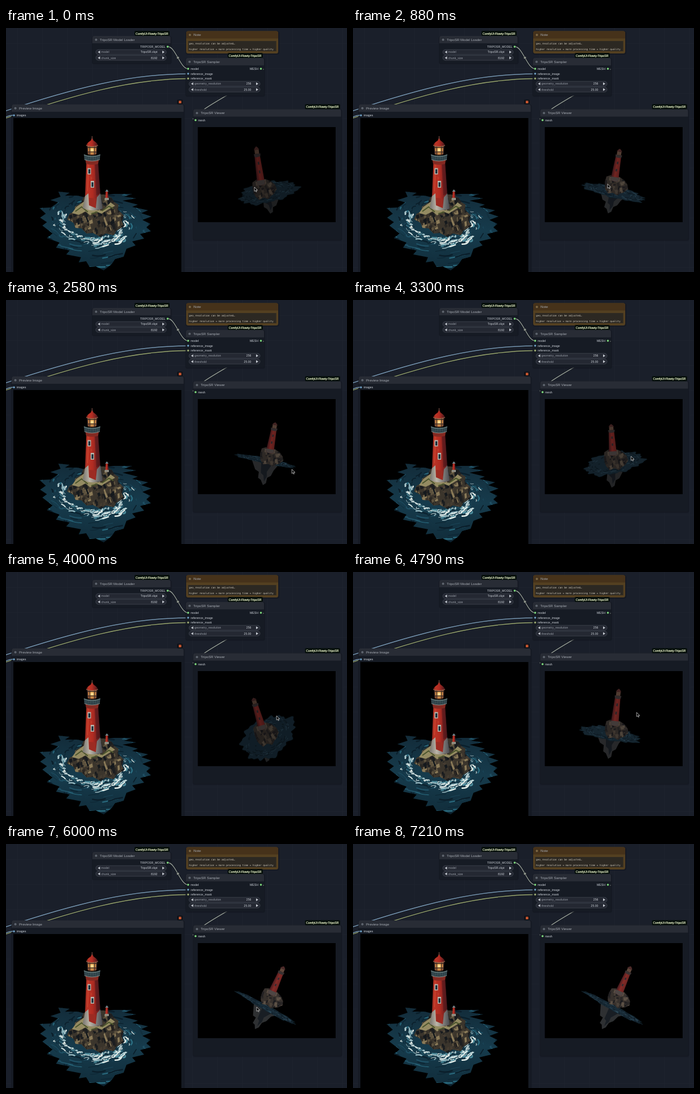
Animation of 600x431 px, one loop 7.24 s. Source, as an HTML page:

```html
<!DOCTYPE html>
<html lang="en">
<head>
<meta charset="utf-8">
<title>Node graph</title>
<style>
html, body { margin: 0; width: 100%; height: 100%; overflow: hidden; background: #1a1f2a; }
svg { display: block; width: 100%; height: 100%; font: 5.2px "Liberation Sans", Arial, sans-serif; }
.title { font-size: 6.15px; fill: #a6abb3; }
.note { font: 4.33px "DejaVu Sans Mono", monospace; fill: #d8d2c4; }
.wire { fill: none; stroke-width: 1.4; }
</style>
</head>
<body>
<svg id="stage" viewBox="0 0 600 431" preserveAspectRatio="none">
  <defs>
    <pattern id="grid" width="44" height="44" patternUnits="userSpaceOnUse" x="20" y="27">
      <path d="M0 .5H44M.5 0V44" stroke="#1d222d" fill="none"/>
    </pattern>
    <linearGradient id="red">
      <stop offset="0" stop-color="#5c1b19"/><stop offset=".2" stop-color="#bd3526"/>
      <stop offset=".5" stop-color="#b02c22"/><stop offset=".75" stop-color="#7c2220"/>
      <stop offset="1" stop-color="#3b1519"/>
    </linearGradient>
    <linearGradient id="dimRed">
      <stop offset="0" stop-color="#3d191d"/><stop offset=".45" stop-color="#852b27"/>
      <stop offset="1" stop-color="#652321"/>
    </linearGradient>
    <linearGradient id="stone">
      <stop offset="0" stop-color="#77746e"/><stop offset=".35" stop-color="#bbb5a8"/>
      <stop offset="1" stop-color="#494a50"/>
    </linearGradient>
    <linearGradient id="sea" x2="0" y2="1">
      <stop offset="0" stop-color="#132c3a"/><stop offset=".5" stop-color="#163b4c"/>
      <stop offset="1" stop-color="#112d3b"/>
    </linearGradient>
    <radialGradient id="glow">
      <stop offset="0" stop-color="#fff0ae"/><stop offset=".45" stop-color="#eead54"/>
      <stop offset="1" stop-color="#8f5433"/>
    </radialGradient>
    <clipPath id="seaClip"><use href="#seaShape"/></clipPath>
    <clipPath id="rockClip"><use href="#rockShape"/></clipPath>
    <clipPath id="reefClip"><use href="#reefShape"/></clipPath>
    <clipPath id="viewClip"><path d="M337.500 175H580V343H337.500Z"/></clipPath>
  </defs>
  <rect width="600" height="431" fill="#1a1f2a"/>
  <rect width="600" height="431" fill="url(#grid)"/>
  <g id="graph"></g>

  <g id="painting">
    <path id="seaShape" fill="url(#sea)" d="M92 289L112 291L104 296L126 296L138 299L190 293L222 293L207 298L229 301L205 305L232 312L222 316L250 322L238 327L256 333L240 339L254 346L247 352L255 359L236 364L243 372L222 377L228 384L212 390L207 404L192 408L186 417L172 428L158 421L147 422L141 412L128 414L132 405L106 400L112 393L88 388L94 379L72 371L82 363L64 349L72 343L60 335L70 328L59 318L79 317L92 308L78 304L96 298Z"/>
    <g clip-path="url(#seaClip)" fill="none" stroke-linecap="round"><g id="waves"></g><g id="foam"></g></g>
    <path id="rockShape" fill="#3b352c" d="M107 338L112 328L120 324L122 315L132 309L136 299L148 294L173 294L186 300L190 307L198 312L197 321L207 331L204 342L208 350L194 358L190 366L176 363L166 369L153 362L142 363L133 354L122 353L119 344Z"/>
    <g id="facets" clip-path="url(#rockClip)"></g>
    <path d="M116 327L124 316L138 306L140 318L170 323L184 308L192 314L181 320L168 328L158 324L148 331L140 324L128 330Z" fill="#948b62"/>
    <path d="M122 324L133 316L144 325M169 323L181 315L189 319M150 328L161 325" stroke="#4b552d" stroke-width="2" fill="none"/>
    <path d="M175.500 289h4l1 15h-6z" fill="url(#red)"/><path d="M174.500 289l3-4l3 4z" fill="#77868a"/><path d="M174 300h7v4h-7z" fill="#8f8b80"/>
    <path d="M141.500 237H162L166 296L169 319Q153 325 136 318L139 296Z" fill="url(#red)"/>
    <path d="M139 297L145 292L146 313L158 318L160 299L166 292L170 319Q153 326 135 318Z" fill="url(#stone)"/>
    <path d="M146 300L158 301L158 318L146 313Z" fill="#9c2b22"/>
    <path d="M156 238L162 237L166 291L159 296Z" fill="#3f141a" opacity=".5"/>
    <path d="M145.500 241L143.500 288M150 263L150 268" stroke="#e4603e" opacity=".5" fill="none"/>
    <path d="M143.500 247.500h6v11h-6zM149 270h6v12h-6z" fill="#bcbab0"/>
    <path d="M145 249.500h3.300v7.500H145zM150.500 272.500h3.300v8h-3.300z" fill="#172d39"/>
    <path d="M139 229H164L162 240Q151 243 141 240Z" fill="#842a22"/>
    <path d="M137 223Q151 229 166 223L165 232Q151 237 138 232Z" fill="#2a3d44"/>
    <path d="M137 224Q151 230 166 224M138 232.500Q151 237.500 165 232.500" stroke="#7d928f" fill="none"/>
    <path id="rail" stroke="#5f777a" stroke-width=".6" fill="none"/>
    <path d="M143 207H160L159 223Q151 226 144 223Z" fill="url(#glow)"/>
    <path d="M143 207L144 223M147.500 208V224M155.500 208V224M160 207L159 223M143 211H160M143.500 219H159.500" stroke="#3b2a27" stroke-width="1.300"/>
    <path d="M141 207.500Q143 202 149 199L151.500 193L154 199Q160 202 162 207.500Q151 211 141 207.500Z" fill="url(#red)"/>
    <path d="M141 207.500Q151 211.500 162 207.500" stroke="#a77558" stroke-width=".9" fill="none"/>
    <path d="M151.500 197V191" stroke="#6b443c" stroke-width="1.400"/>
  </g>

  <g clip-path="url(#viewClip)">
    <g id="model">
      <path id="under" fill="#2e3032"/>
      <path id="underShade" fill="#191e24"/>
      <path id="disc" fill="#192c38" stroke="#142530" stroke-width=".6"/>
      <path id="ripples" fill="none" stroke="#2e495a" stroke-width=".8"/>
      <path id="darkRipples" fill="none" stroke="#111f29" stroke-width="1.300"/>
      <g id="reef">
        <path id="reefShape" d="M-15 -5L-8 -9L9 -8L18 -3L24 4L26 12L20 20L14 23L9 28L1 24L-7 27L-13 20L-15 14L-16 5Z" fill="#37312d"/>
        <g id="reefFacets" clip-path="url(#reefClip)"></g>
      </g>
      <g id="tower">
        <path d="M-5 -50L4.500 -50L7 0Q0 4 -7 0Z" fill="url(#dimRed)"/>
        <path d="M-6.600 -7L6.600 -7L7 0Q0 4 -7 0Z" fill="#4e4644"/>
        <path d="M-1 -39h2.500v5h-2.500zM-1 -24h2.500v5h-2.500z" fill="#302c31"/>
        <path d="M-6 -53H6L5 -48Q0 -46 -5 -48Z" fill="#3a3233"/>
        <path d="M-3.800 -60H3.800V-53H-3.800Z" fill="#5f463a"/>
        <path d="M-4.800 -60Q-3 -64 0 -66Q3 -64 4.800 -60Z" fill="#4d2a29"/>
      </g>
    </g>
  </g>
  <path id="cursor" d="M0 0V7.500L1.800 6L3 8.500L4.300 7.900L3.100 5.400H5.500Z" fill="#050505" stroke="#e6e6e6" stroke-width=".7"/>
</svg>
<script>
const $ = id => document.getElementById(id);
const LOOP = 7240, TAU = Math.PI * 2;

function random(seed) {
  return () => (seed = (seed * 16807) % 2147483647) / 2147483647;
}

const HEAD = '#282c35';
const box = (x, y, w, h, fill, r = 0, extra = '') =>
  `<rect x="${x}" y="${y}" width="${w}" height="${h}" rx="${r}" fill="${fill}" ${extra}/>`;
const label = (x, y, text, cls = '', fill = '#cbd0d7', anchor = 'start') =>
  `<text x="${x}" y="${y}" text-anchor="${anchor}" class="${cls}" ${cls ? '' : `fill="${fill}"`}>${text}</text>`;
const dot = (x, y, fill, r = 2) => `<circle cx="${x}" cy="${y}" r="${r}" fill="${fill}" stroke="#11151b" stroke-width=".5"/>`;
const wire = (d, color) => `<path class="wire" d="${d}" stroke="#10131a" style="stroke-width:2.600"/><path class="wire" d="${d}" stroke="${color}"/>`;

function node(x, y, w, h, title, head = HEAD, body = '#161b24') {
  return box(x - 1, y, w + 3, h + 2, '#11141c', 4, 'opacity=".5"') +
    box(x, y, w, h, body, 3.5) +
    `<path d="M${x} ${y + 13}v-9.500q0-3.500 3.500-3.500h${w - 7}q3.500 0 3.500 3.500v9.500z" fill="${head}"/>` +
    dot(x + 6.500, y + 6.700, head === HEAD ? '#5d636d' : '#7d6540', 2.500) +
    label(x + 13, y + 8.800, title, 'title');
}

function badge(x, y) {
  return box(x, y, 62, 9, '#07100c', 2) +
    `<text x="${x + 2}" y="${y + 6.500}" fill="#e9f3c8" stroke="#e9f3c8" stroke-width=".2">ComfyUI-Flowty-TripoSR</text>`;
}

function widget(x, y, w, name, value) {
  const arrow = (ax, dir) => `<path d="M${ax} ${y + 4.400}l${4 * dir} -2.500v5z" fill="#c4c9d0"/>`;
  return box(x, y, w, 8.800, '#242832', 4.400, 'stroke="#555b66" stroke-width=".5"') +
    arrow(x + 3.500, 1) + arrow(x + w - 3, -1) +
    label(x + 9.500, y + 6.200, name, '', '#969ca5') +
    label(x + w - 15.500, y + 6.200, value, '', '#cbd0d7', 'end');
}

const GREEN = '#82df82', BLUE = '#6f9fc4', OLIVE = '#9ba973', GREY = '#969f98';

$('graph').innerHTML = [
  wire('M-20 153C120 105 220 81 320 81', '#7899b5'),
  wire('M-20 166C120 117 220 90 320 89.500', OLIVE),
  wire('M452 72C466 85 319 148 333 163', GREY),

  node(152, 14, 137.500, 48, 'TripoSR Model Loader'), badge(226, 5),
  label(280.500, 35, 'TRIPOSR_MODEL', '', undefined, 'end'),
  widget(158, 38.200, 124, 'model', 'TripoSR.ckpt'), widget(158, 48.300, 124, 'chunk_size', '8192'),

  node(317, 5.500, 162, 39.500, 'Note', '#46321a', '#544021'),
  box(320.500, 23, 155, 18, '#2c2822'),
  label(322, 29.300, 'geo_resolution can be adjusted…', 'note'),
  label(322, 38.800, 'higher resolution = more processing time = higher quality', 'note'),

  node(316.500, 53, 137.500, 66.500, 'TripoSR Sampler'), badge(390, 44),
  wire('M285 33C298 33 307 72 320 72', GREY), dot(302.500, 52.500, '#959b91', 2.200),
  dot(284.500, 33, GREEN), dot(320.500, 72, GREEN), dot(320.500, 80.700, BLUE), dot(320.500, 89.300, OLIVE),
  label(325, 74, 'model'), label(325, 82.700, 'reference_image'), label(325, 91.300, 'reference_mask'),
  label(444, 74, 'MESH', '', undefined, 'end'), dot(448.500, 72, GREEN), dot(453, 73, GREY, .9),
  widget(322, 94.200, 125, 'geometry_resolution', '256'), widget(322, 104.300, 125, 'threshold', '25.00'),

  node(10, 135, 302.500, 310, 'Preview Image'),
  box(301, 126.500, 10, 8.500, '#101218', 2), box(304, 128.500, 4.500, 4.500, '#c9572f', .5),
  wire('M-2 158Q5 154 13 154', '#7899b5'), dot(14, 154.300, BLUE), label(18.500, 156.200, 'images'),
  box(13, 159, 295.500, 272, '#000'),

  node(329.500, 143.500, 260, 230.500, 'TripoSR Viewer'), badge(526, 134.500),
  dot(333.500, 162.800, GREEN), dot(329, 160.500, GREY, .9), label(338, 164.800, 'mesh'),
  box(337.500, 175, 242.500, 168, '#000')
].join('');

function paintScene() {
  const rnd = random(73), pick = list => list[Math.floor(rnd() * list.length)];
  // A stroke that follows the swell round the island.
  const swell = (a, r, span, color, width) => {
    const at = (angle, k) => `${(156 + Math.cos(angle) * 51 * k).toFixed(1)} ${(340 + Math.sin(angle) * 30 * k).toFixed(1)}`;
    return `<path d="M${at(a, r)}Q${at(a + span / 2, r + rnd() * .18 - .05)} ${at(a + span, r + rnd() * .1)}" stroke="${color}" stroke-width="${width.toFixed(1)}"/>`;
  };
  const shards = (count, x0, y0, w, h, size, colors) => Array.from({ length: count }, () => {
    const x = x0 + rnd() * w, y = y0 + rnd() * h, dx = size * (.3 + rnd() * .7), dy = size * (.4 + rnd() * 1.2);
    return `<path d="M${x} ${y}l${dx} ${-size * .3}l${rnd() * size * .6} ${dy}l${-dx} ${size * .4}z" fill="${pick(colors)}"/>`;
  }).join('');

  let waves = '', foam = '';
  for (let i = 0; i < 230; i++) {
    waves += swell(rnd() * TAU, 1 + rnd() * 1.9, .05 + rnd() * .22,
      pick(['#0b1f2b', '#0e2836', '#1f5064', '#2a6c80', '#12303f', '#0c2431']), .6 + rnd() * 2.2);
  }
  for (let i = 0; i < 130; i++) {
    foam += swell(-.5 + rnd() * 4, 1 + rnd() * rnd() * .42, .03 + rnd() * .13,
      pick(['#cfdfde', '#9dbfc6', '#e2ebe6', '#4a8796', '#1c4a5c']), .5 + rnd() * 2);
  }
  for (let i = 0; i < 45; i++) {
    foam += swell(.65 + rnd() * .9, 1.15 + rnd() * .4, .05 + rnd() * .15,
      pick(['#dce8e6', '#b3d0d4', '#4c8b9b', '#e6efea']), .6 + rnd() * 2);
  }
  $('waves').innerHTML = waves;
  $('foam').innerHTML = foam;
  $('facets').innerHTML = shards(190, 105, 300, 100, 66, 6, ['#1c1e20', '#2a2723', '#5d523e', '#8a7a58', '#15191d', '#453c31', '#24211f']);
  $('reefFacets').innerHTML = shards(70, -18, -10, 42, 36, 5, ['#1c1c1f', '#292626', '#4a4139', '#5b5045', '#222022', '#38312c']);
  $('rail').setAttribute('d', Array.from({ length: 9 }, (_, i) => `M${139 + i * 3.100} 225v8`).join(''));
}
paintScene();

// Each pose: time, tower base, tower top, sea centre, radii, roll, yaw, lowest point, light.
const poses = [
  [0, 449, 276, 440, 209, 461, 290, 53, 19, -11, 0, 465, 328, .65],
  [1550, 467, 265, 489, 216, 459, 290, 59, 5, 29, .9, 438, 327, 1],
  [2580, 464, 269, 474, 216, 457, 284, 54, 5, 11.7, .5, 452, 327, .85],
  [4000, 451, 277, 435, 222, 461, 292, 52, 34, -32, -.3, 458, 336, .68],
  [4790, 460, 270, 468, 206, 453, 286, 54, 12, 10, .4, 449, 330, .85],
  [6000, 467, 265, 489, 216, 459, 290, 59, 5, 29, .9, 438, 327, 1],
  [LOOP, 467, 265, 489, 216, 459, 290, 59, 5, 29, .9, 438, 327, 1]
];
const pointer = [
  [0, 437, 281], [1550, 455, 272], [2580, 503, 299], [4000, 476, 254],
  [4790, 499, 248], [6000, 441, 288], [6700, 441, 288]
];

function sample(keys, t) {
  let i = 0;
  while (i < keys.length - 2 && t >= keys[i + 1][0]) i++;
  const a = keys[i], b = keys[i + 1];
  const p = Math.min(1, (t - a[0]) / (b[0] - a[0])), ease = (1 - Math.cos(Math.PI * p)) / 2;
  return a.slice(1).map((v, k) => v + (b[k + 1] - v) * ease);
}

const edge = a => .96 + .06 * Math.sin(3 * a + 1) + .05 * Math.sin(7 * a) + .05 * Math.sin(13 * a) + .04 * Math.sin(23 * a);
const shoreAngles = Array.from({ length: 110 }, (_, i) => i / 110 * TAU);
const rnd = random(19);
const flecks = Array.from({ length: 110 }, () => ({ a: rnd() * TAU, r: .25 + Math.sqrt(rnd()) * .58, size: .03 + rnd() * .11 }));
const trace = points => 'M' + points.map(p => p.map(v => v.toFixed(1)).join(' ')).join('L');

function draw(t) {
  const [bx, by, tx, ty, cx, cy, rx, ry, roll, yaw, ux, uy, light] = sample(poses, t);
  const c = Math.cos(roll * Math.PI / 180), s = Math.sin(roll * Math.PI / 180);
  const local = (x, y) => [cx + x * c - y * s, cy + x * s + y * c];
  const onSea = (a, r) => local(Math.cos(a + yaw) * r * rx, Math.sin(a + yaw) * r * ry);
  const ripple = f => trace([onSea(f.a, f.r), onSea(f.a + f.size, f.r + .03), onSea(f.a + f.size * 2, f.r)]);

  $('disc').setAttribute('d', trace(shoreAngles.map(a => onSea(a, edge(a)))) + 'Z');
  $('ripples').setAttribute('d', flecks.filter((_, i) => i % 2).map(ripple).join(''));
  $('darkRipples').setAttribute('d', flecks.filter((_, i) => i % 2 === 0).map(ripple).join(''));

  const depth = (f, dx) => [cx + (ux - cx) * f + dx, cy + (uy - cy) * f];
  $('under').setAttribute('d', trace([local(-26, 0), depth(.35, -17), depth(.45, -10), depth(.7, -10), depth(.78, -5),
    [ux, uy], depth(.92, 5), depth(.7, 6), depth(.62, 12), depth(.4, 16), local(25, 0)]) + 'Z');
  $('underShade').setAttribute('d', trace([local(-8, 0), depth(.5, -6), depth(.6, -1), depth(.85, 1), depth(.65, 5), depth(.45, 4), local(14, 0)]) + 'Z');

  const lean = Math.atan2(tx - bx, by - ty) * 180 / Math.PI, scale = Math.hypot(tx - bx, ty - by) / 66;
  const squash = .8 + Math.min(.35, ry / 100);
  $('tower').setAttribute('transform', `translate(${bx} ${by}) rotate(${lean}) scale(1 ${scale})`);
  $('reef').setAttribute('transform', `translate(${bx} ${by}) rotate(${lean}) scale(1 ${squash})`);
  $('model').setAttribute('opacity', light);

  const [px, py] = sample(pointer, t);
  $('cursor').setAttribute('transform', `translate(${px} ${py})`);
  $('cursor').setAttribute('visibility', t < 6700 ? 'visible' : 'hidden');
}

const start = performance.now();
function tick() {
  draw((performance.now() - start) % LOOP);
  requestAnimationFrame(tick);
}
tick();
</script>
</body>
</html>
```
